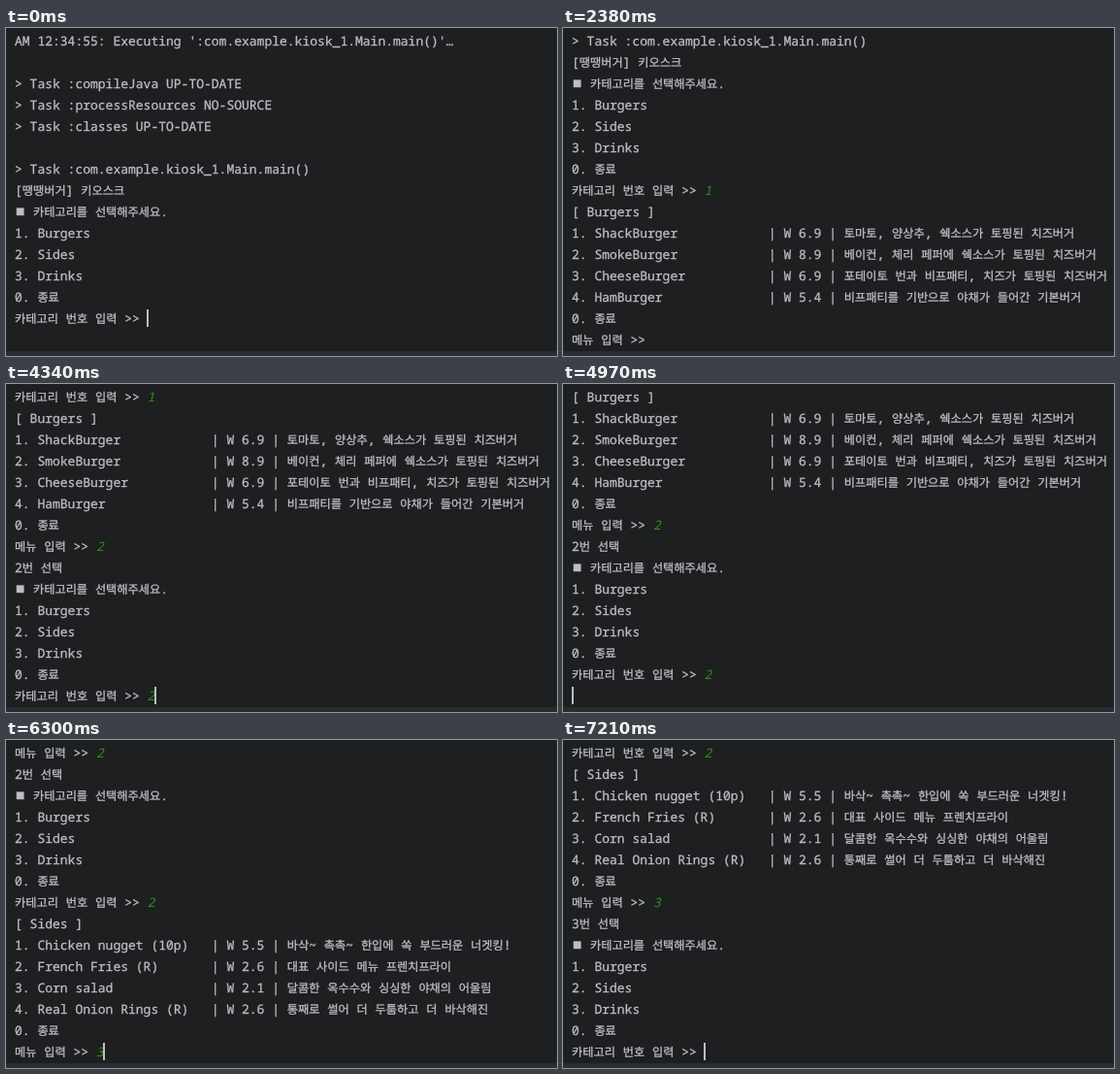
An HTML page for the animation above (8000 ms loop, 568 by 338 pixels).

```html
<!DOCTYPE html>
<html lang="ko">
<head>
<meta charset="utf-8">
<title>Kiosk console</title>
<style>
  html, body { margin: 0; width: 100%; height: 100%; overflow: hidden; background: #1e1f21; }
  svg { display: block; width: 568px; height: 338px; }
  text {
    font: 13px "Noto Sans Mono", "DejaVu Sans Mono", monospace;
    fill: #bcbec4;
    stroke: #bcbec4;
    stroke-width: 0.3px;
    white-space: pre;
    text-rendering: geometricPrecision;
    font-variant-ligatures: none;
  }
  .ko, .box { font-family: "Noto Sans CJK KR", "Noto Sans CJK", "Noto Sans CJK JP", sans-serif; }
  .ko { font-size: 12.2px; }
  .box { font-size: 9.8px; letter-spacing: 0.7px; baseline-shift: 0.8px; stroke: none; }
  .input { fill: #299516; stroke: none; font-style: italic; }
</style>
</head>
<body>
<svg viewBox="0 0 568 338">
  <g id="rows"></g>
  <rect id="caret" width="2" height="18" fill="#bcbec4"/>
  <rect y="333" width="568" height="5" fill="#2b2c2f"/>
</svg>
<script>
const LOOP = 8000, LEFT = 9, PITCH = 22, BASE = 18, ROWS = 15;
const LATIN = 7.8, HANGUL = 11.224;

const item = (name, price, note) => `${name.padEnd(26)}| W ${price} | ${note}`;
const categories = [
  '■ 카테고리를 선택해주세요.', '1. Burgers', '2. Sides', '3. Drinks', '0. 종료'
];
const askCategory = '카테고리 번호 입력 >> ', askMenu = '메뉴 입력 >> ';

const lines = [
  "AM 12:34:55: Executing ':com.example.kiosk_1.Main.main()'…",
  '',
  '> Task :compileJava UP-TO-DATE',
  '> Task :processResources NO-SOURCE',
  '> Task :classes UP-TO-DATE',
  '',
  '> Task :com.example.kiosk_1.Main.main()',
  '[땡땡버거] 키오스크',
  ...categories,
  askCategory + '1',
  '[ Burgers ]',
  item('1. ShackBurger', '6.9', '토마토, 양상추, 쉑소스가 토핑된 치즈버거'),
  item('2. SmokeBurger', '8.9', '베이컨, 체리 페퍼에 쉑소스가 토핑된 치즈버거'),
  item('3. CheeseBurger', '6.9', '포테이토 번과 비프패티, 치즈가 토핑된 치즈버거'),
  item('4. HamBurger', '5.4', '비프패티를 기반으로 야채가 들어간 기본버거'),
  '0. 종료',
  askMenu + '2',
  '2번 선택',
  ...categories,
  askCategory + '2',
  '[ Sides ]',
  item('1. Chicken nugget (10p)', '5.5', '바삭~ 촉촉~ 한입에 쏙 부드러운 너겟킹!'),
  item('2. French Fries (R)', '2.6', '대표 사이드 메뉴 프렌치프라이'),
  item('3. Corn salad', '2.1', '달콤한 옥수수와 싱싱한 야채의 어울림'),
  item('4. Real Onion Rings (R)', '2.6', '통째로 썰어 더 두툼하고 더 바삭해진'),
  '0. 종료',
  askMenu + '3',
  '3번 선택',
  ...categories,
  askCategory
];

// [start ms, lines printed, state of the last line, caret shown, top row if not at the end]
const steps = [
  [0, 14, 'prompt', true],
  [210, 14, 'prompt', false],
  [630, 14, 'typed', true],
  [1330, 14, 'typed', false],
  [1540, 14, 'entered', true],
  [1820, 21, 'prompt', true],
  [2380, 21, 'prompt', false],
  [2520, 21, 'typed', true],
  [3290, 21, 'entered', true],
  [3500, 28, 'prompt', true],
  [4340, 28, 'typed', true],
  [4970, 28, 'entered', true],
  [5250, 32, 'typed', false],
  [5320, 35, 'prompt', true],
  [6090, 35, 'prompt', false],
  [6300, 35, 'typed', true],
  [6930, 35, 'entered', true],
  [7140, 40, 'typed', false, 24 + 6 / PITCH],
  [7210, 42, 'prompt', true]
];

const rows = document.getElementById('rows');
const caret = document.getElementById('caret');

function svg(tag, parent) {
  return parent.appendChild(document.createElementNS('http://www.w3.org/2000/svg', tag));
}

function addRun(parent, text, cls) {
  const span = svg('tspan', parent);
  span.textContent = text;
  if (cls) span.setAttribute('class', cls);
  if (cls === 'box') span.setAttribute('dx', 0.7);
}

function addLine(line, y) {
  const text = svg('text', rows);
  text.setAttribute('x', LEFT);
  text.setAttribute('y', y);
  const [, output, input] = line.match(/^(.*?)((?<=>> )\d)?$/);
  for (const run of output.match(/[가-힣]+|■|[^가-힣■]+/g) || []) {
    addRun(text, run, /[가-힣]/.test(run) ? 'ko' : run === '■' ? 'box' : '');
  }
  if (input) addRun(text, input, 'input');
}

const lineWidth = line =>
  [...line].reduce((sum, ch) => sum + (/[가-힣■]/.test(ch) ? HANGUL : LATIN), 0);

function show([, count, state, caretOn, fixedTop]) {
  const shown = lines.slice(0, count);
  if (state === 'prompt') shown[count - 1] = shown[count - 1].replace(/\d$/, '');
  if (state === 'entered') shown.push('');
  const top = fixedTop ?? Math.max(0, shown.length - ROWS);

  rows.replaceChildren();
  shown.forEach((line, i) => {
    if (line && i >= Math.floor(top)) addLine(line, BASE + (i - top) * PITCH);
  });

  const last = shown.length - 1;
  caret.setAttribute('x', Math.floor(LEFT + lineWidth(shown[last])));
  caret.setAttribute('y', 4 + (last - top) * PITCH);
  caret.setAttribute('visibility', caretOn ? 'visible' : 'hidden');
}

let current;
const start = performance.now();
function tick() {
  const t = Math.max(0, performance.now() - start) % LOOP;
  const step = steps.findLast(s => s[0] <= t);
  if (step !== current) show(current = step);
  requestAnimationFrame(tick);
}
tick();
</script>
</body>
</html>
```
